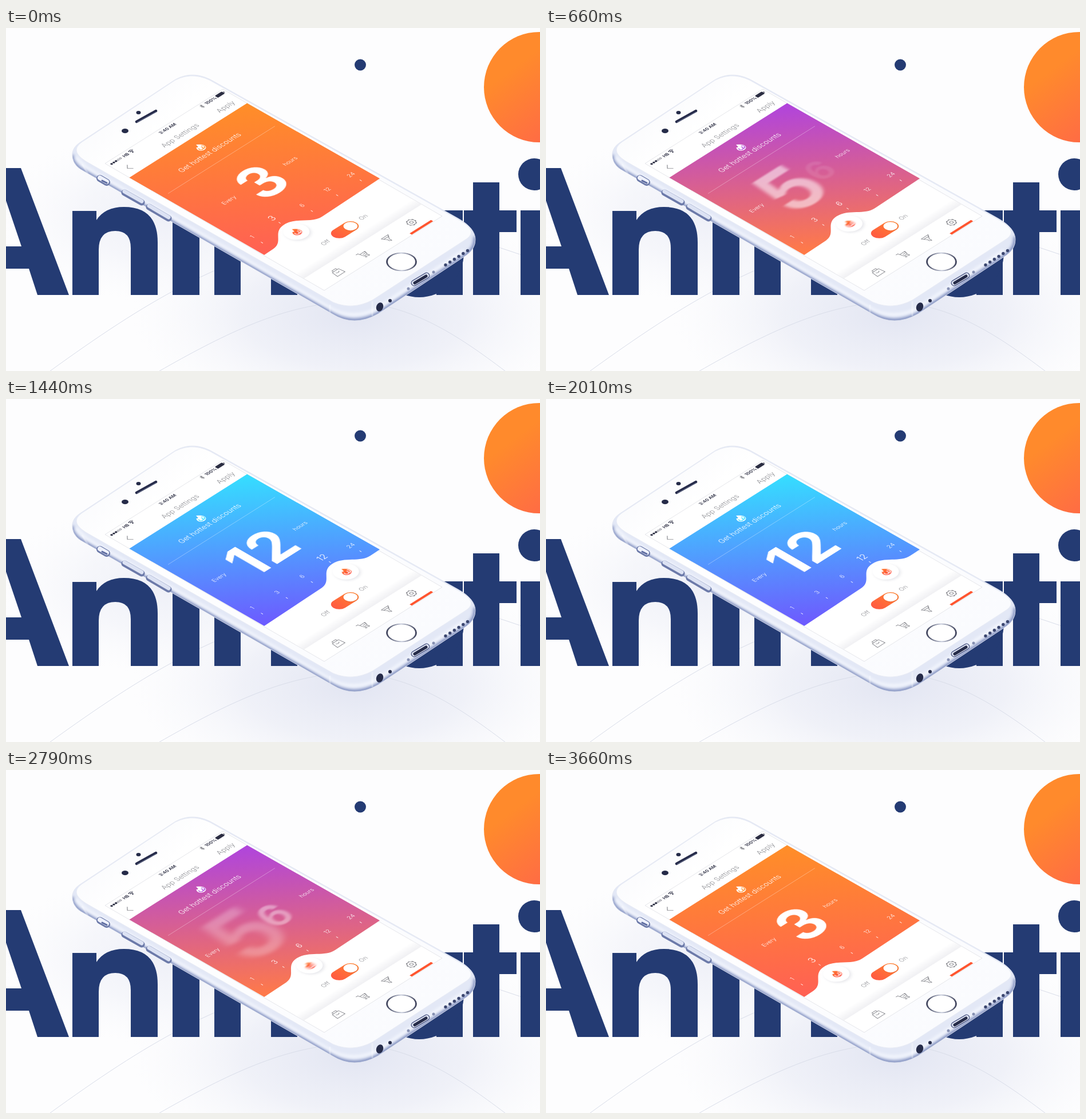
Recreate the animation shown at these times as an HTML page. Size 933 by 600 pixels, loop 3690 ms.

```html
<!DOCTYPE html>
<html lang="en">
<head>
<meta charset="utf-8">
<title>Discount settings</title>
<style>
html, body { margin: 0; width: 100%; height: 100%; overflow: hidden; background: #fdfdfe; }
svg { display: block; width: 100vw; height: 100vh; }
text { font-family: Inter, "Open Sans", sans-serif; font-weight: 300; text-anchor: middle; }
.status { font-size: 12px; font-weight: 600; fill: #2b2d42; }
.grey { fill: #8f9095; font-size: 19px; }
.small { font-size: 16px; }
.icon { fill: none; stroke: #85868c; stroke-width: 1.5; stroke-linejoin: round; stroke-linecap: round; }
.white { fill: #fff; }
.big { font-size: 151px; font-weight: 700; fill: #fff; }
</style>
</head>
<body>
<svg viewBox="0 0 933 600" preserveAspectRatio="xMidYMid slice">
<defs>
  <radialGradient id="haze">
    <stop offset="0" stop-color="#e2e5f2"/>
    <stop offset=".5" stop-color="#ebedf6" stop-opacity=".75"/>
    <stop offset="1" stop-color="#f6f7fb" stop-opacity="0"/>
  </radialGradient>
  <linearGradient id="sun" x1=".1" y1=".2" x2=".7" y2="1">
    <stop offset=".2" stop-color="#ff8a2c"/><stop offset="1" stop-color="#ff6748"/>
  </linearGradient>
  <linearGradient id="panelFill" gradientUnits="userSpaceOnUse" x1="390" y1="135" x2="410" y2="395">
    <stop id="topStop" offset="0"/><stop id="bottomStop" offset="1"/>
  </linearGradient>
  <linearGradient id="switchFill"><stop offset="0" stop-color="#ff5a42"/><stop offset="1" stop-color="#ff8130"/></linearGradient>
  <linearGradient id="flameFill" x1="0" y1="0" x2="0" y2="1"><stop offset="0" stop-color="#ff7a2c"/><stop offset="1" stop-color="#ff4a3c"/></linearGradient>
  <linearGradient id="tabShade" x1="0" y1="0" x2="0" y2="1"><stop offset="0" stop-color="#fff"/><stop offset="1" stop-color="#f0f0f3"/></linearGradient>
  <linearGradient id="ring" x1="0" y1="0" x2="1" y2="1">
    <stop offset=".1" stop-color="#30344e"/><stop offset=".5" stop-color="#c4c9d9"/><stop offset=".9" stop-color="#30344e"/>
  </linearGradient>
  <linearGradient id="glass" x1="0" y1="0" x2="1" y2=".7">
    <stop offset="0" stop-color="#f6f7fb"/><stop offset=".25" stop-color="#fff"/><stop offset="1" stop-color="#fafbfe"/>
  </linearGradient>
  <filter id="soft" x="-50%" y="-50%" width="200%" height="200%"><feGaussianBlur stdDeviation="4"/></filter>
  <filter id="soft2" x="-20%" y="-20%" width="140%" height="140%"><feGaussianBlur stdDeviation="2.5"/></filter>
  <filter id="blurA" x="-40%" y="-40%" width="180%" height="180%"><feGaussianBlur stdDeviation="0"/></filter>
  <filter id="blurB" x="-40%" y="-40%" width="180%" height="180%"><feGaussianBlur stdDeviation="0"/></filter>
  <filter id="knobBlur" x="-60%" y="-60%" width="220%" height="220%"><feGaussianBlur stdDeviation="0"/></filter>
  <path id="body" d="M128 201L296 90Q329 72 366 95L790 333Q820 350 820 370Q820 386 805 397L650 500Q608 524 570 500L130 247Q114 236 116 218Q118 208 128 201Z"/>
  <clipPath id="bodyClip"><use href="#body"/></clipPath>
  <clipPath id="panelClip"><path id="wave" transform="matrix(.5493 -.3467 .5742 .333 173 237)"/></clipPath>
  <path id="flame" d="M0-13C7-8 11-3 11 3A11 10 0 0 1-11 3C-11-1-8-3-7-6C-5-3-3-3-2-5C-1-8-1-10 0-13Z"/>
  <path id="swirl" d="M-6 1A5 5 0 1 0 2 1M6-2A6 6 0 0 1 3 9" fill="none" stroke-width="2" stroke-linecap="round"/>
</defs>

<rect width="933" height="600" fill="#fdfdfe"/>
<ellipse cx="610" cy="500" rx="390" ry="190" fill="url(#haze)"/>
<ellipse cx="270" cy="330" rx="280" ry="150" fill="url(#haze)" opacity=".55"/>
<g fill="none" stroke="#d9dde9" stroke-width="1">
  <path d="M77 600C240 482 380 395 560 365S820 370 933 408"/>
  <path d="M268 600C370 542 480 484 590 480S790 538 872 600"/>
</g>
<circle cx="931.5" cy="103.5" r="96.5" fill="url(#sun)"/>
<circle cx="619" cy="64.5" r="10" fill="#243b73"/>

<g fill="#243b73" role="img" aria-label="Animation">
  <path fill-rule="evenodd" d="M-60 245H26L110 467H55L40 421H-30V382H27L0 302L-30 382Z"/>
  <path d="M116 320H158V336Q173 313 206 313Q265 313 265 375V467H218V385Q218 355 191 355Q162 355 162 388V467H116Z"/>
  <path d="M291 319h47v148h-47ZM364 319h46v148h-46ZM463 319h46v148h-46ZM752 319h46v148h-46ZM899 319h46v148h-46Z"/>
  <circle cx="722" cy="393" r="56" fill="none" stroke="#243b73" stroke-width="44"/>
  <path d="M816 270H862V319H892V357H862V467H816V357H800V319H816Z"/>
  <circle cx="923" cy="256" r="28"/>
</g>

<!-- Phone body -->
<use href="#body" fill="#e3e8f6"/>
<g clip-path="url(#bodyClip)" fill="none">
  <path d="M114 222Q114 238 130 248L570 501Q608 524 650 501L805 398Q822 386 821 365" stroke="#8694c2" stroke-width="9" filter="url(#soft2)"/>
  <path d="M122 226L140 244L572 493Q608 510 646 492L800 389" stroke="#f7f9ff" stroke-width="4" filter="url(#soft2)"/>
  <path d="M133 238l10 17M566 484v20M640 478v26" stroke="#fff" stroke-width="3" opacity=".3"/>
</g>
<use href="#body" fill="none" stroke="#e2e6f0" stroke-width=".8"/>
<path d="M132 200L296 91Q330 74 366 97L792 336Q824 354 806 368L640 476Q606 494 572 480L148 238Q108 217 132 200Z" fill="url(#glass)" stroke="#e9ecf5" stroke-width="1"/>
<g stroke-linecap="round" fill="none">
  <path d="M164 263L176 270" stroke="#6c7aa9" stroke-width="12"/><path d="M164 262L176 269" stroke="#eef1fb" stroke-width="8"/>
  <path d="M168 267L176 271" stroke="#5e6ca0" stroke-width="3"/>
  <path d="M207 288L237 305M250 313L284 333" stroke="#6c7aa9" stroke-width="11"/>
  <path d="M207 286L237 303M250 311L284 331" stroke="#dce2f3" stroke-width="7"/>
  <path d="M228 164L262 145" stroke="#262b4a" stroke-width="4.5"/>
  <path d="M229 165L262 147" stroke="#68718f" stroke-width="1"/>
  <path d="M713 446L735 433" stroke="#525d88" stroke-width="11"/><path d="M713 446L735 433" stroke="#dfe4f2" stroke-width="8"/>
  <path d="M714 446L734 434" stroke="#252b49" stroke-width="5"/>
</g>
<g fill="#252b49">
  <ellipse cx="208" cy="180" rx="6" ry="4"/><ellipse cx="231.5" cy="148" rx="4" ry="3"/>
  <ellipse cx="653" cy="488" rx="6" ry="8" transform="rotate(20 653 488)"/>
  <circle cx="671" cy="477" r="3"/>
</g>
<g id="holes" fill="#3b466f"></g>
<circle cx="703" cy="456" r="2.5" fill="#8791b3"/><circle cx="747" cy="427" r="2.5" fill="#8791b3"/>
<circle r="32" transform="matrix(.5493 -.3467 .5742 .333 691 409)" fill="#fff" stroke="url(#ring)" stroke-width="3.6"/>

<!-- Screen -->
<g transform="matrix(.5493 -.3467 .5742 .333 173 237)">
  <rect width="375" height="667" fill="#fff" stroke="#dcdde3" stroke-width="1"/>
  <g fill="#2b2d42">
    <circle cx="9" cy="11.5" r="3"/><circle cx="16" cy="11.5" r="3"/><circle cx="23" cy="11.5" r="3"/>
    <g fill="none" stroke="#2b2d42"><circle cx="30" cy="11.5" r="2.5" stroke-width=".8"/><circle cx="37" cy="11.5" r="2.5" stroke-width=".8"/>
      <path d="M66 9Q72.5 3 79 9M68.5 12Q72.5 8 76.5 12" stroke-width="2"/></g>
    <circle cx="72.5" cy="15" r="2"/>
    <rect x="345" y="4" width="22" height="10" rx="2"/><rect x="368" y="7" width="2" height="4"/>
  </g>
  <text class="status" x="54" y="16">HB</text>
  <text class="status" x="187" y="15.5">3:40 AM</text>
  <text class="status" x="326" y="14">100%</text>
  <path class="icon" d="M295 7l6 6-3 3V4l3 3-6 6" stroke-width="1"/>
  <path class="icon" d="M30 39L21 48L30 57"/>
  <text class="grey" x="188" y="55">App Settings</text>
  <text class="grey" x="333" y="55">Apply</text>
</g>
<g clip-path="url(#panelClip)"><rect x="210" y="125" width="450" height="280" fill="url(#panelFill)"/></g>
<g transform="matrix(.5493 -.3467 .5742 .333 173 237)">
  <use href="#flame" class="white" x="188" y="110"/>
  <use href="#swirl" id="headSwirl" x="188" y="110"/>
  <text class="white" x="188" y="145" font-size="19.5">Get hottest discounts</text>
  <path d="M17 175.5H357" stroke="#fff" stroke-opacity=".45"/>
  <text id="every" class="white" y="294" font-size="15">Every</text>
  <text id="hours" class="white" y="293" font-size="15">hours</text>
  <g id="numA" filter="url(#blurA)"><text class="big" y="55"></text></g>
  <g id="numB" filter="url(#blurB)"><text class="big" y="55"></text></g>
  <g id="scale"></g>

  <g id="knob">
    <circle cy="5" r="29" fill="#b9bac6" opacity=".35" filter="url(#soft)"/>
    <circle r="29" fill="#fff"/>
    <g filter="url(#knobBlur)"><use href="#flame" fill="url(#flameFill)"/><use href="#swirl" stroke="#fff"/></g>
  </g>

  <text class="grey small" x="128" y="554">Off</text>
  <text class="grey small" x="252" y="550">On</text>
  <rect x="155" y="529" width="72" height="36" rx="18" fill="url(#switchFill)"/>
  <circle cx="209" cy="549" r="15" fill="#b33c1f" opacity=".3" filter="url(#soft2)"/>
  <circle cx="209" cy="547" r="15.5" fill="#fff"/>
  <rect x="1" y="578" width="373" height="27" fill="url(#tabShade)"/>
  <g class="icon">
    <path d="M59 635H79L81 653H57ZM63 635V630H75V635M64 641Q69 647 74 641"/>
    <path d="M142 628H147L151 643H162L165 633H149M154 638H162"/><circle cx="153" cy="648" r="2"/><circle cx="161" cy="648" r="2"/>
    <path d="M222 628H244L235 640V648L230 645V640ZM225 633H241"/>
    <circle cx="312" cy="634" r="4"/><circle cx="312" cy="634" r="10"/><circle cx="312" cy="634" r="11" stroke-width="2" stroke-dasharray="4 4.64" stroke-linecap="butt"/>
  </g>
  <rect x="280" y="659" width="68" height="6.5" fill="#ff552f"/>
</g>
</svg>
<script>
const LOOP = 3690;
const $ = id => document.getElementById(id);
const set = (el, attrs) => { for (const k in attrs) el.setAttribute(k, attrs[k]); };
const add = (parent, tag, attrs) => {
  const el = document.createElementNS("http://www.w3.org/2000/svg", tag);
  set(el, attrs);
  return parent.appendChild(el);
};

// Smooth monotone curve through [time, value] points.
function curve(points) {
  const slope = i => points[i + 1] && points[i]
    ? (points[i + 1][1] - points[i][1]) / (points[i + 1][0] - points[i][0]) : 0;
  const tangent = i => {
    const a = slope(i - 1), b = slope(i);
    return a * b > 0 ? 2 * a * b / (a + b) : 0;
  };
  return t => {
    let i = 0;
    while (i < points.length - 2 && t >= points[i + 1][0]) i++;
    const [t0, a] = points[i], [t1, b] = points[i + 1];
    const w = t1 - t0, u = (t - t0) / w, r = 1 - u;
    return a * r * r * (1 + 2 * u) + b * u * u * (3 - 2 * u)
      + w * u * r * (r * tangent(i) - u * tangent(i + 1));
  };
}

// Change per millisecond around time t.
const speedOf = (f, t) => Math.abs(f(Math.min(LOOP, t + 8)) - f(Math.max(0, t - 8))) / 16;

const knobX = curve([[0, 112], [300, 115], [660, 153], [1050, 253], [1300, 268], [1500, 269.5],
  [1900, 269.5], [2180, 267], [2520, 230], [2900, 130], [3100, 112], [LOOP, 112]]);
const count = curve([[0, 3], [300, 3.15], [660, 5.36], [1050, 11.5], [1250, 11.93], [1500, 12],
  [1950, 12], [2180, 11.85], [2520, 9.83], [2900, 4.2], [3120, 3.13], [3480, 3], [LOOP, 3]]);
const spread = curve([[0, 98], [300, 110], [660, 137], [900, 150], [1050, 150], [1500, 128.5],
  [2010, 128.5], [2200, 135], [2520, 150], [2800, 150], [3120, 113], [3480, 98], [LOOP, 98]]);

// Knob position, top colour, bottom colour
const palette = [
  [112, [255, 142, 40], [255, 97, 83]],
  [153, [176, 68, 221], [255, 122, 72]],
  [230, [66, 152, 255], [190, 53, 226]],
  [253, [48, 166, 255], [191, 54, 234]],
  [269.5, [53, 223, 255], [107, 92, 255]]
];
function panelColor(x, which) {
  let i = 0;
  while (i < palette.length - 2 && x > palette[i + 1][0]) i++;
  const a = palette[i], b = palette[i + 1];
  const u = Math.min(1, Math.max(0, (x - a[0]) / (b[0] - a[0])));
  return `rgb(${a[which].map((c, j) => Math.round(c + (b[which][j] - c) * u))})`;
}

for (let i = 0; i < 6; i++) add($("holes"), "circle", { cx: 768 + i * 7.7, cy: 414.5 - i * 5, r: 2.7 });

const labels = [[1, 31], [3, 110], [6, 190], [12, 270], [24, 345]].map(([value, x]) => {
  const text = add($("scale"), "text", { class: "white", y: 5.5, "font-size": 15.5 });
  text.textContent = value;
  const tick = add($("scale"), "path", { d: "M0-4V2", stroke: "#fff", "stroke-width": 1.3 });
  return { x, text, tick };
});

function drawNumber(suffix, n, value, speed) {
  const d = value - n, group = $("num" + suffix);
  const size = Math.exp(.83 * d);
  const alpha = Math.min(1, Math.max(0, 1.2 - 1.75 * Math.abs(d)));
  group.firstChild.textContent = n;
  set(group, {
    transform: `translate(${190 - 110 * Math.log(size)} 293) scale(${size})`,
    opacity: alpha
  });
  const spreadBlur = Math.max(0, Math.abs(d) - .17) * 10;
  set($("blur" + suffix).firstChild, { stdDeviation: `${Math.max(spreadBlur, speed * 400)} ${spreadBlur}` });
}

function draw(t) {
  const k = knobX(t), v = count(t), gap = spread(t);
  const base = x => 482.5 - 9 * x / 375;
  const low = base(k), peak = low - 42;
  set($("wave"), { d: `M0 74L375 73.5L379 473.5L${k + 80} ${base(k + 80)}`
    + `C${k + 45} ${low} ${k + 38} ${peak} ${k} ${peak}`
    + `C${k - 38} ${peak} ${k - 45} ${low} ${k - 80} ${base(k - 80)}L2 482.5Z` });
  const top = panelColor(k, 1);
  set($("topStop"), { "stop-color": top });
  set($("bottomStop"), { "stop-color": panelColor(k, 2) });
  set($("headSwirl"), { stroke: top });
  set($("every"), { x: 190 - gap });
  set($("hours"), { x: 190 + gap });
  set($("knob"), { transform: `translate(${k} 475)` });
  const knobBlur = Math.min(3, Math.max(0, speedOf(knobX, t) - .1) * 50);
  set($("knobBlur").firstChild, { stdDeviation: `${knobBlur} 0` });

  for (const { x, text, tick } of labels) {
    const near = Math.max(0, 1 - Math.abs(k - x) / 85);
    const lift = near * near * (3 - 2 * near);
    set(text, { transform: `translate(${x} ${418 - 16 * lift}) scale(${1 + .55 * lift})` });
    set(tick, { transform: `translate(${x} ${449 - 22 * lift})` });
  }
  const n = Math.floor(v + 1e-6), speed = speedOf(count, t);
  drawNumber("A", n, v, speed);
  drawNumber("B", n + 1, v, speed);
}

function frame() {
  draw(performance.now() % LOOP);
  requestAnimationFrame(frame);
}
frame();
</script>
</body>
</html>
```
